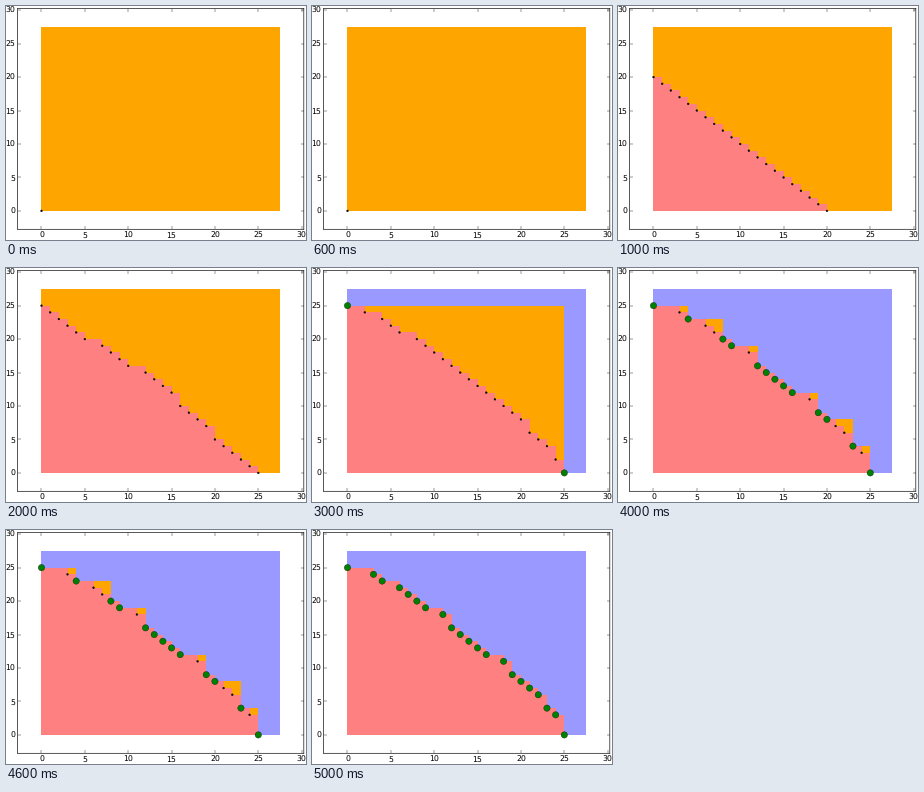
Animation, 300 px wide and 234 px high, one loop 6 s. Source, as a matplotlib script:

```python
import matplotlib.pyplot as plt
from matplotlib.animation import FuncAnimation
from matplotlib.patches import Ellipse

W, H, DPI = 300, 234, 96
PT = 72 / DPI            # points per pixel
X0, Y0 = 35.49, 204.9    # pixel place of the data origin
SX, SY = 8.672, 6.69     # pixels per data unit
LOW, HIGH = -2.75, 30.25
TOP = 27.5               # upper corner of the search square
ORANGE, RED, BLUE = "#ffa500", "#ff8080", "#9999ff"

plt.rcParams["font.family"] = "DejaVu Sans"
plt.rcParams["text.hinting"] = "none"


def front(n, gaps=()):
    """Points of a symmetric decreasing front on the integers 0..n."""
    kept = [k for k in range(n + 1) if k not in gaps]
    return list(zip(kept, reversed(kept)))


def stairs(points):
    """Outline that runs right, then down, from each point to the next."""
    path = [points[0]]
    for (_, y0), (x1, y1) in zip(points, points[1:]):
        path += [(x1, y0), (x1, y1)]
    return path


final = front(25, (1, 2, 5, 10, 17))
some = {0, 4, 8, 9, 12, 13, 14, 15, 16, 19, 20, 23, 25}

# Each stage: the candidate front and the x values of its confirmed points
stages = [
    (front(0), set()),
    (front(20), set()),
    (front(25, (6, 11)), set()),
    (front(25, (1, 3, 7)), {0, 25}),
    (final, some),
    (final, {x for x, _ in final}),
]

fig = plt.figure(figsize=(W / DPI, H / DPI), dpi=DPI, facecolor="white")
span = HIGH - LOW
ax = fig.add_axes([(X0 + LOW * SX) / W, 1 - (Y0 - LOW * SY) / H,
                   span * SX / W, span * SY / H])


def style_axes():
    ax.set(xlim=(LOW, HIGH), ylim=(LOW, HIGH),
           xticks=range(0, 31, 5), yticks=range(0, 31, 5))
    ax.tick_params(direction="in", top=True, right=True, length=2.6 * PT,
                   width=0.4 * PT, pad=2.5 * PT, labelsize=7.7 * PT)
    for spine in ax.spines.values():
        spine.set_linewidth(0.65 * PT)
        spine.set_snap(False)


def area(path, color):
    ax.fill(*zip(*path), facecolor=color, edgecolor="none", linewidth=0)


def dots(points, color, size):
    for p in points:
        ax.add_patch(Ellipse(p, size / SX, size / SY, facecolor=color,
                             edgecolor="black", linewidth=0.3 * PT, zorder=3))


def draw(i):
    ax.clear()
    style_axes()
    points, xs = stages[i]
    sure = [p for p in points if p[0] in xs]

    area([(0, 0), (TOP, 0), (TOP, TOP), (0, TOP)], ORANGE)
    if len(points) > 1:
        area([(0, 0)] + stairs(points), RED)
    if sure:
        area(stairs(sure) + [(TOP, 0), (TOP, TOP), (0, TOP)], BLUE)
    dots(points, "black", 1.9)
    dots(sure, "#008000", 6.4)
    return []


anim = FuncAnimation(fig, draw, frames=len(stages), init_func=lambda: draw(0),
                     interval=1000, repeat=True, repeat_delay=0, blit=False)
plt.show()
```
